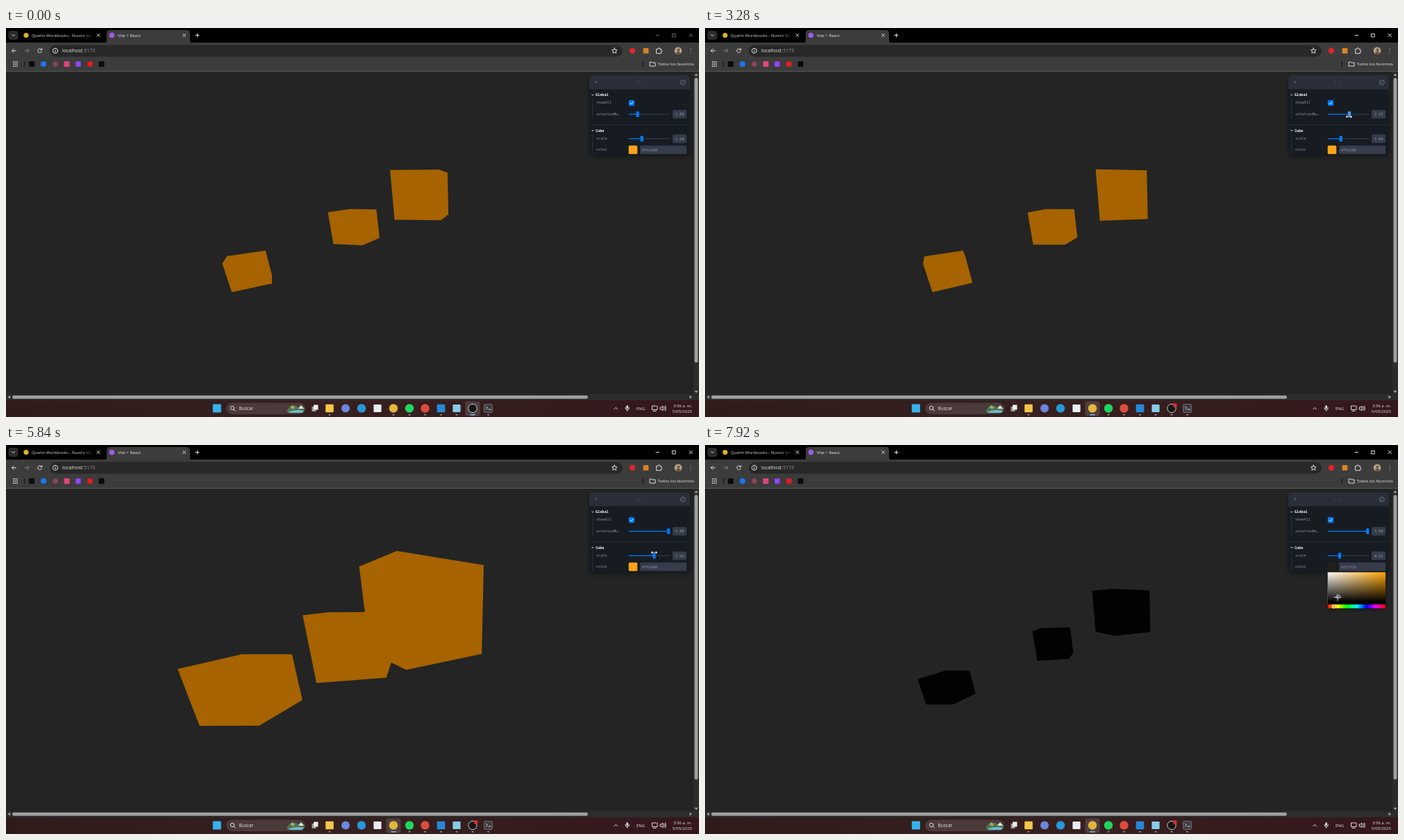
An HTML page for the animation above (8 s loop, 998 px wide and 561 px high).

```html
<!DOCTYPE html>
<html lang="es">
<head>
<meta charset="utf-8">
<title>Vite + React</title>
<style>
  html, body { margin: 0; width: 100%; height: 100%; overflow: hidden; background: #242424; }
  svg { display: block; width: 998px; height: 561px; }
  text { font: 6.1px "Open Sans", "Noto Sans", sans-serif; fill: #e8e8e8; white-space: pre; }
  .mono { font: 5.2px "Noto Sans Mono", "DejaVu Sans Mono", monospace; fill: #8c92a4; }
  .bold { font-weight: 700; fill: #fefefe; }
  .line { fill: none; stroke: #dedede; stroke-width: 1; stroke-linecap: round; stroke-linejoin: round; }
  .dim { stroke: #818181; }
  .field { fill: #373c4b; }
  .blue { fill: #007bff; }
</style>
</head>
<body>
<svg viewBox="0 0 998 561">
  <defs>
    <linearGradient id="fade" gradientUnits="userSpaceOnUse" x1="112" x2="125">
      <stop stop-color="#d6d6d6"/><stop offset="1" stop-color="#d6d6d6" stop-opacity="0"/>
    </linearGradient>
    <linearGradient id="bar">
      <stop stop-color="#301b1b"/><stop offset=".5" stop-color="#36201f"/><stop offset="1" stop-color="#35171b"/>
    </linearGradient>
    <linearGradient id="sat"><stop stop-color="#fff"/><stop offset="1" stop-color="#ffa500"/></linearGradient>
    <linearGradient id="val" x2="0" y2="1"><stop stop-opacity="0"/><stop offset=".92"/></linearGradient>
    <linearGradient id="hue">
      <stop stop-color="#f00"/><stop offset=".17" stop-color="#ff0"/><stop offset=".33" stop-color="#0f0"/>
      <stop offset=".5" stop-color="#0ff"/><stop offset=".67" stop-color="#00f"/>
      <stop offset=".83" stop-color="#f0f"/><stop offset="1" stop-color="#f00"/>
    </linearGradient>
    <filter id="shadow" x="-10%" y="-10%" width="120%" height="125%"><feDropShadow dx="0" dy="2" stdDeviation="3" flood-opacity=".35"/></filter>
  </defs>

  <rect width="998" height="561" fill="#242424"/>
  <g id="cubes"></g>

  <!-- browser window -->
  <rect width="998" height="22" fill="#010101"/>
  <rect x="3.5" y="4" width="14" height="13" rx="4" fill="#2b2b2b"/>
  <path class="line" d="M8.6 9.5l2 2 2-2"/>
  <text x="37" y="13" fill="url(#fade)" style="fill:url(#fade)">Quelm Workbooks - Nuviro Vau</text>
  <path class="line" d="M131 8.5l4 4m0-4l-4 4M273 10.5h5m-2.5-2.5v5" stroke-width=".8"/>
  <path d="M141 22q4 0 4-4V8q0-5 5-5h110q5 0 5 5v10q0 4 4 4z" fill="#3c3c3c"/>
  <text x="161" y="13">Vite + React</text>
  <path class="line" d="M254.600 8.500l4 4m0-4l-4 4"/>
  <g id="controls"><path class="line" stroke-width=".8" d="M936 10.500h4.500M959.800 8.400h4.400v4.400h-4.400zM984 8.300l4.400 4.400m0-4.400l-4.400 4.400"/></g>
  <rect y="21" width="998" height="42" fill="#3c3c3c"/>
  <rect x="63" y="24.500" width="825" height="17" rx="8.500" fill="#282828"/>
  <rect y="62" width="998" height="1" fill="#565656"/>
  <path class="line" d="M14.500 32.800H8.500m2.700-2.700l-2.700 2.700 2.700 2.700"/>
  <path class="line dim" d="M27 32.800h6m-2.700-2.700l2.700 2.700-2.700 2.700"/>
  <path class="line" d="M51.200 31.200a2.900 2.900 0 1 0 .3 2.500M51.800 29.700v2h-2"/>
  <circle cx="71" cy="32.800" r="3.600" class="line" stroke-width=".8"/>
  <path class="line" stroke-width=".8" d="M71 32.500v2M71 31v.1"/>
  <text x="81" y="35.400" style="font-size:7px">localhost<tspan fill="#9a9a9a">:5173</tspan></text>
  <path class="line" stroke-width=".8" d="M876.300 29l1.100 2.500 2.700.3-2 1.800.6 2.700-2.400-1.400-2.400 1.400.6-2.700-2-1.800 2.700-.3z"/>
  <path class="line" d="M937 30.300h2q0-1.700 1.200-1.700t1.200 1.700h2v2.200q1.400 0 1.400 1.100t-1.400 1.100v2h-6.400z"/>
  <circle cx="968" cy="32.800" r="5.300" fill="#b9a584"/>
  <path d="M965 37.500q0-4 3-4t3.500 3.500q-3 2-6.500.5z" fill="#6b5848"/><circle cx="968.500" cy="31.500" r="2" fill="#6b5848"/>
  <path d="M986 29.500h.1m-.1 3.200h.1m-.1 3.200h.1" class="line" stroke-width="1.500"/>
  <path d="M10 49h7M10 52h7M10 55h7" stroke="#dedede" stroke-width="1.700" stroke-dasharray="1.700 .9" fill="none"/>
  <path d="M26.500 48v8M917.500 48v8" stroke="#111" stroke-width="1"/>
  <path class="line" stroke-width=".8" d="M927.500 49h2.500l1 1h4v5h-7.500z"/>
  <text x="938.500" y="54.300" style="font-size:6px">Todos los favoritos</text>

  <!-- scrollbars -->
  <path d="M990 63h8v474H0v-9h990z" fill="#2c2c2c"/>
  <rect x="991.500" y="72" width="5" height="410.500" rx="2.500" fill="#9f9f9f"/>
  <rect x="9" y="530" width="829" height="4.800" rx="2.400" fill="#9f9f9f"/>
  <path fill="#9f9f9f" d="M991.500 69l2.500-3.500 2.500 3.500zM991.500 523l2.500 3.500 2.500-3.500zM6 529.700v5l-3.500-2.500zM984.500 529.700v5l3.500-2.500z"/>

  <!-- taskbar -->
  <rect y="537" width="998" height="24" fill="url(#bar)"/>
  <rect x="317" y="540.500" width="114" height="16.500" rx="8.200" fill="#4b3a3a"/>
  <circle cx="326" cy="548" r="2.700" class="line"/><path class="line" d="M328 550l2.300 2.300"/>
  <text x="335.500" y="551" style="font-size:6.500px">Buscar</text>
  <path d="M404 553q3-8 8-7 4-4 8 1 5-4 10 1v3q-2 4-5 4h-17z" fill="#55704c"/>
  <path d="M409 547l3-3 4 3-2 3z" fill="#8fb56a"/><path d="M406 554q10-5 23-2l-3 3h-17z" fill="#68bdd2"/>
  <path d="M421 549l4-5 4 5z" fill="#e6e4dc"/>
  <rect id="active" y="538.500" width="21" height="21" rx="3" fill="#503d3f"/>
  <g id="icons"></g>
  <path d="M440.500 546h6v7h-6z" fill="#9d9d9d"/><path d="M443 543.500h6.500v7H443z" fill="#eee"/>
  <g id="dots"></g>
  <rect id="activeDot" y="557" width="8" height="1.600" rx=".8" fill="#6fb4e8"/>
  <circle id="badge" cx="676.800" cy="544" r="2.900" fill="#d92b2b"/>
  <path class="line" d="M875.800 549.700l2.400-2.400 2.400 2.400"/>
  <rect x="893.300" y="544.300" width="2.800" height="5" rx="1.400" fill="#dedede"/>
  <path class="line" stroke-width=".8" d="M891.900 547.500q0 3.300 2.800 3.300t2.800-3.300m-2.800 3.300v1.500"/>
  <text x="908" y="551" style="font-size:6px">ENG</text>
  <path class="line" stroke-width=".9" d="M936.500 545h-6v5.500h7.500v-2M932 552.500h4M938 545v2.500M942.500 547h1.500l2-2v7l-2-2h-1.500zM948 546.500q1.200 2 0 4m1.500-5.500q2.200 3.500 0 7"/>
  <text x="988" y="547" text-anchor="end" style="font-size:6px">3:56 a. m.</text>
  <text x="988" y="555.300" text-anchor="end" style="font-size:6px">5/05/2025</text>

  <!-- control panel -->
  <g filter="url(#shadow)">
    <rect x="840" y="68" width="145" height="116" rx="5" fill="#181c20"/>
    <path d="M840 88.500V73q0-5 5-5h135q5 0 5 5v15.500z" fill="#292d39"/>
  </g>
  <path d="M847.300 76.800h5.200l-2.600 3.200z" fill="#535760"/>
  <path d="M907 77h10M907 80h10" stroke="#535760" stroke-width="1.200" stroke-dasharray="1.200 2.900"/>
  <circle cx="974.800" cy="78.500" r="3.500" fill="none" stroke="#6d7284" stroke-width="1"/><path d="M973 80l3-3" stroke="#6d7284"/>
  <path d="M842.800 95.700h4l-2 2.500zM842.800 147h4l-2 2.500z" fill="#8c92a4"/>
  <text class="mono bold" x="849" y="98.300">Global</text>
  <text class="mono bold" x="849" y="149.700">Cube</text>
  <path d="M844.600 102v29M844.600 153.500V182" stroke="#373c4b" stroke-width=".7"/>
  <path d="M840 139.500h145" stroke="#292d39" stroke-width=".8"/>
  <text class="mono" x="850" y="109.300">showAll</text>
  <text class="mono" x="850" y="125.600">rotationMu…</text>
  <text class="mono" x="850" y="161">scale</text>
  <text class="mono" x="850" y="177.200">color</text>
  <rect class="blue" x="896.800" y="104" width="8.300" height="8.300" rx="1.500"/>
  <path d="M898.800 108.200l1.500 1.600 2.900-3.100" fill="none" stroke="#fff" stroke-width="1"/>
  <g id="sliders"></g>
  <rect id="swatch" x="896.700" y="169.500" width="12.600" height="12.300" rx="1.500"/>
  <rect class="field" x="913" y="169.500" width="67" height="12.300" rx="1.500"/>
  <text class="mono" id="hex" x="916" y="177.700"></text>
  <g id="picker">
    <g filter="url(#shadow)"><rect x="896.700" y="183.500" width="83.300" height="52" rx="1.500"/></g>
    <rect x="896.700" y="183.500" width="83.300" height="46.500" fill="url(#sat)"/>
    <rect x="896.700" y="183.500" width="83.300" height="46.500" fill="url(#val)"/>
    <rect x="896.700" y="230" width="83.300" height="5.500" rx="1" fill="url(#hue)"/>
    <circle cx="905.700" cy="232.800" r="2.500" fill="#ffa500" stroke="#fff" stroke-width=".9"/>
    <circle id="pick" r="2.600" stroke="#fff" stroke-width=".9"/>
  </g>

  <g id="cursor" stroke="#111" stroke-width=".5" fill="#fff">
    <path d="M0 0v9l2.100-2 1.500 3.400 1.400-.6-1.500-3.300h3z"/>
    <path d="M-5 0l2.700-2.400v1.700h4.600v-1.700L5 0 2.300 2.400V.7h-4.600v1.700z"/>
    <path d="M-.7-5.500H.7v4.800h4.800V.7H.7v4.800H-.7V.7h-4.800V-.7h4.800z"/>
  </g>
</svg>

<script>
const LOOP = 8000, STEP = 80;
const $ = id => document.getElementById(id);

function el(parent, tag, attrs) {
  const node = document.createElementNS("http://www.w3.org/2000/svg", tag);
  for (const key in attrs) node.setAttribute(key, attrs[key]);
  return parent.appendChild(node);
}
const set = (node, attrs) => { for (const key in attrs) node.setAttribute(key, attrs[key]); };
const dot = (x, y, r, fill) => el($("icons"), "circle", { cx: x, cy: y, r, fill });
const box = (x, y, r, fill) => el($("icons"), "rect", { x: x - r, y: y - r, width: 2 * r, height: 2 * r, rx: 1, fill });

// plain marks: tabs, extensions, bookmarks, taskbar
dot(29, 10.5, 3.6, "#e0b02c"); dot(152.500, 10.5, 3.8, "#a259e8");
dot(902, 32.8, 4.2, "#e0252b"); box(921.5, 32.8, 3.9, "#d98324");
box(37, 52, 4, "#0b0b0b"); dot(54, 52, 4, "#1877f2"); dot(71, 52, 3.8, "#8d4456");
box(87.500, 52, 4, "#e0447c"); box(104, 52, 3.7, "#9146ff"); box(121, 52, 3.6, "#f01818"); box(137.500, 52, 4, "#0b0b0b");
box(303.8, 548.5, 6, "#35b3ee"); box(466, 548.5, 5.8, "#f3c649"); dot(489, 548.5, 6, "#6b86dd");
dot(512, 548.5, 6.2, "#2797d6"); box(535, 548.5, 5.6, "#e9eef2");
dot(558, 548.5, 6.2, "#e0b63a"); dot(581, 548.5, 6.2, "#1ed760"); dot(603.5, 548.5, 6.2, "#dd4b3e");
box(626.5, 548.5, 5.8, "#2489d8"); box(649, 548.5, 5.6, "#86cdea"); dot(672, 548.5, 6.2, "#151515");
$("icons").lastChild.setAttribute("stroke", "#d0d0d0");
box(694.500, 548.5, 5.8, "#3a3a40"); $("icons").lastChild.setAttribute("stroke", "#777");
el($("icons"), "path", { d: "M691.5 546l2 2-2 2m3.500 0h3", class: "line" });
for (const x of [466, 558, 581, 603.5, 626.5, 649, 672, 694.5])
  el($("dots"), "rect", { x: x - 1.600, y: 557, width: 3.200, height: 1.500, rx: .75, fill: "#a39a9a" });

function makeSlider(y, min, max) {
  const g = $("sliders");
  el(g, "rect", { x: 896.8, y: y - .5, width: 59.500, height: 1, fill: "#373c4b" });
  const fill = el(g, "rect", { x: 896.8, y: y - .6, height: 1.200, class: "blue" });
  const thumb = el(g, "rect", { y: y - 4.200, width: 4.200, height: 8.400, rx: 1 });
  el(g, "rect", { x: 960, y: y - 6.200, width: 20, height: 12.400, rx: 1.500, class: "field" });
  const label = el(g, "text", { x: 976.500, y: y + 2, "text-anchor": "end", class: "mono" });
  return (value, dragging) => {
    const x = 898.5 + 55.7 * (value - min) / (max - min);
    fill.setAttribute("width", x - 896.8);
    set(thumb, { x: x - 2.1, fill: dragging ? "#4b9bff" : "#007bff" });
    label.textContent = value.toFixed(2);
  };
}
const rotationSlider = makeSlider(124.400, 0, 5), scaleSlider = makeSlider(159.600, .1, 3);

// perspective camera: focal length, optical centre, downward pitch
const FOCAL = 308.9, CX = 661, CY = 316.6, SIN = .2747, COS = .9615;
const cubes = [
  { x: 351.1, y: 348.9, half: .066, base: 28.7, speed: 1 },
  { x: 503.6, y: 285.7, half: .0708, base: 30.2, speed: .1 },
  { x: 600.1, y: 240.5, half: .1028, base: 28.9, speed: .2 }
].map(c => ({ ...c, node: el($("cubes"), "polygon", {}) }));

function hull(points) {
  points.sort((p, q) => p[0] - q[0] || p[1] - q[1]);
  const chain = list => {
    const out = [];
    for (const p of list) {
      for (;;) {
        const [a, b] = out.slice(-2);
        if (!b || (b[0] - a[0]) * (p[1] - a[1]) > (b[1] - a[1]) * (p[0] - a[0])) break;
        out.pop();
      }
      out.push(p);
    }
    return out.slice(0, -1);
  };
  return [...chain(points), ...chain([...points].reverse())];
}

function outline(cube, multiplier, scale) {
  const half = cube.half * scale, points = [];
  for (let i = 0; i < 4; i++) {
    const angle = cube.base * Math.PI / 180 + cube.speed * multiplier + i * Math.PI / 2;
    const side = half * Math.SQRT2 * Math.sin(angle), depth = -half * Math.SQRT2 * Math.cos(angle);
    for (const drop of [-half, half]) {
      const z = 1 + COS * depth + SIN * drop;
      points.push([
        CX + (cube.x - CX + FOCAL * side) / z,
        CY + (cube.y - CY + FOCAL * (COS * drop - SIN * depth)) / z
      ]);
    }
  }
  return hull(points).map(p => p.map(v => v.toFixed(2)).join()).join(" ");
}

// keys are [time, value...], eased between neighbours
function track(keys, t) {
  const next = keys.findIndex(k => k[0] > t);
  if (next < 0) return keys.at(-1).slice(1);
  if (next === 0) return keys[0].slice(1);
  const a = keys[next - 1], b = keys[next];
  const u = (t - a[0]) / (b[0] - a[0]), e = u * u * (3 - 2 * u);
  return a.slice(1).map((v, i) => v + (b[i + 1] - v) * e);
}
const rotationKeys = [[1440, 1], [2320, 3.3], [3280, 2.65], [4480, 3.4], [4720, 5]];
const scaleKeys = [[4960, 1], [5360, 1.99], [5600, 2.25], [6320, .97], [6480, .91]];
const colorKeys = [[7360, 1, 1], [7920, .18, .129]];
const cursorKeys = [
  [480, 672, 530], [1360, 909, 125], [1440, 909, 125], [2320, 936.5, 125], [3280, 927.5, 128],
  [4480, 937.5, 130], [4720, 956, 131], [4780, 956, 131], [4940, 915.5, 155], [4960, 915.5, 155],
  [5360, 935, 155], [5600, 940, 155], [6320, 914.5, 155], [6480, 913, 155],
  [6800, 903, 175], [7040, 903, 175], [7360, 979, 185], [7920, 911, 219.5]
];

function pickedColor(s, v) {
  const low = v * (1 - s), hue = .647 + .02 * (1 - s);
  return [v, low + (v - low) * hue, low].map(c => Math.round(c * 255));
}

function draw(t) {
  const focused = t >= 160;
  const multiplier = Math.round(track(rotationKeys, t)[0] * 20) / 20;
  const scale = track(scaleKeys, t)[0];
  const [s, v] = track(colorKeys, t);
  const rgb = pickedColor(s, v);
  const lit = rgb.map(c => Math.round(166 * (c / 255) ** 1.19 * v));
  for (const cube of cubes)
    set(cube.node, { points: outline(cube, multiplier, scale), fill: `rgb(${lit})` });

  rotationSlider(multiplier, t >= 1440 && t < 4780);
  scaleSlider(scale, false);
  $("hex").textContent = "#" + rgb.map(c => c.toString(16).padStart(2, "0")).join("");
  $("swatch").setAttribute("fill", v === 1 && s === 1 ? "#ffa31a" : `rgb(${rgb})`);
  $("picker").style.display = t >= 7040 ? "" : "none";
  set($("pick"), { cx: 896.7 + 83.3 * s, cy: 183.5 + 40.5 * (1 - v), fill: `rgb(${rgb})` });

  $("controls").setAttribute("opacity", focused ? 1 : .45);
  const app = focused ? 558 : 672;
  $("active").setAttribute("x", app - 10.5);
  $("activeDot").setAttribute("x", app - 4);
  $("badge").style.display = focused ? "" : "none";

  const [x, y] = track(cursorKeys, t);
  const shape = t >= 7120 ? 2 : t >= 1360 && t < 6560 ? 1 : 0;
  $("cursor").setAttribute("transform", `translate(${x} ${y})`);
  $("cursor").style.display = t >= 480 ? "" : "none";
  [...$("cursor").children].forEach((path, i) => { path.style.display = i === shape ? "" : "none"; });
}

const start = performance.now();
function tick() {
  const t = (performance.now() - start) % LOOP;
  draw(Math.floor(t / STEP) * STEP);
  requestAnimationFrame(tick);
}
tick();
</script>
</body>
</html>
```
